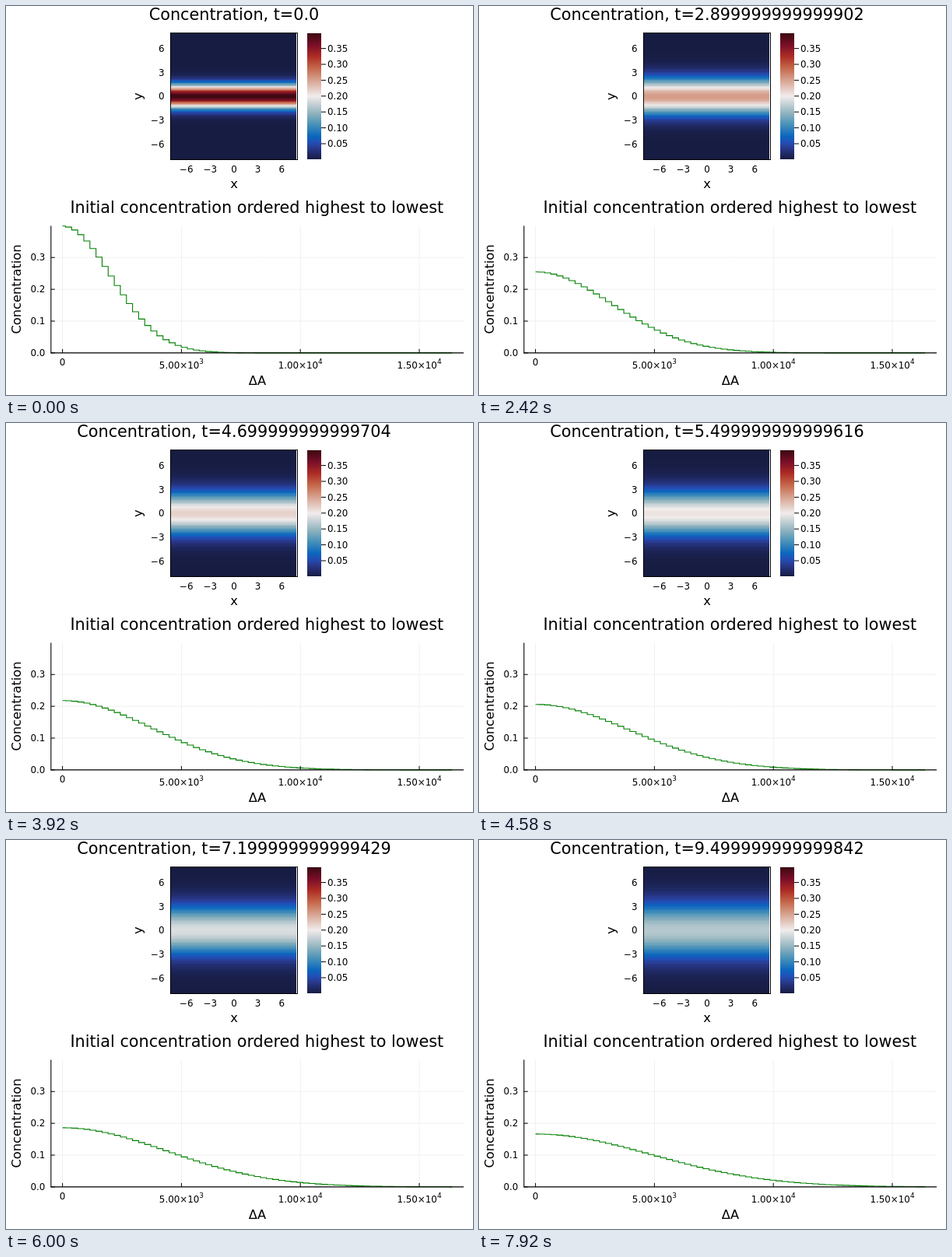
An HTML page with a canvas for the animation above (8 s loop, 600 by 500 pixels).

```html
<!DOCTYPE html>
<html lang="en">
<head>
<meta charset="utf-8">
<title>Diffusing concentration</title>
<style>
  html, body { margin: 0; width: 100%; height: 100%; overflow: hidden; background: #fff; }
  canvas { display: block; }
</style>
</head>
<body>
<canvas id="stage" width="600" height="500"></canvas>
<script>
const ctx = document.getElementById('stage').getContext('2d');
const LOOP = 8000, FRAMES_PER_CS = 0.12;
const PEAK = 1 / Math.sqrt(2 * Math.PI);
const TICK = 11.86, GUIDE = 16.3, TITLE = 20.75;

// Diverging colour scale: position, red, green, blue
const STOPS = [
  [0, 23, 28, 66], [1 / 11, 41, 58, 143], [1.5 / 11, 33, 79, 184], [2 / 11, 11, 102, 189],
  [3 / 11, 69, 144, 185], [4 / 11, 142, 178, 190], [5 / 11, 210, 216, 219], [0.5, 241, 236, 235],
  [6 / 11, 230, 210, 204], [7 / 11, 213, 157, 137], [8 / 11, 196, 101, 72],
  [9 / 11, 172, 43, 36], [10 / 11, 120, 14, 40], [1, 60, 9, 17]
];

function colour(value) {
  const v = Math.min(1, Math.max(0, value));
  const i = Math.max(1, STOPS.findIndex(s => s[0] >= v));
  const a = STOPS[i - 1], b = STOPS[i];
  const k = (v - a[0]) / (b[0] - a[0]);
  const [r, g, bl] = [1, 2, 3].map(c => Math.round(a[c] + (b[c] - a[c]) * k));
  return `rgb(${r},${g},${bl})`;
}

function text(str, x, y, size, align = 'center') {
  ctx.font = `${size}px "DejaVu Sans", sans-serif`;
  ctx.textAlign = align;
  ctx.fillStyle = '#000';
  ctx.fillText(str, x, y);
}

function verticalText(str, x, y, size) {
  ctx.save();
  ctx.translate(x, y);
  ctx.rotate(-Math.PI / 2);
  text(str, 0, 0, size);
  ctx.restore();
}

function line(x1, y1, x2, y2, style = '#000', width = 1) {
  ctx.strokeStyle = style;
  ctx.lineWidth = width;
  ctx.beginPath();
  ctx.moveTo(x1, y1);
  ctx.lineTo(x2, y2);
  ctx.stroke();
}

function powerLabel(base, exponent, x, y) {
  const supSize = TICK * 0.75;
  ctx.font = `${supSize}px "DejaVu Sans", sans-serif`;
  const supWidth = ctx.measureText(exponent).width;
  ctx.font = `${TICK}px "DejaVu Sans", sans-serif`;
  const baseWidth = ctx.measureText(base).width;
  const left = x - (baseWidth + supWidth) / 2;
  text(base, left, y, TICK, 'left');
  text(exponent, left + baseWidth, y - 6, supSize, 'left');
}

// The clock adds up many small time steps, so its rounding error shows in the title.
function clockLabel(frame) {
  let t = 0;
  for (let i = 0; i < frame * 50; i++) t += 0.002;
  return Number.isInteger(t) ? t.toFixed(1) : String(t);
}

function concentration(y, time) {
  const variance = 1 + time / 2;
  return PEAK / Math.sqrt(variance) * Math.exp(-y * y / (2 * variance));
}

function drawHeatmap(time) {
  const centreX = 293, centreY = 116.2, unit = 10.2;
  for (let py = 35; py < 198; py++) {
    const y = Math.round((centreY - py - 0.5) / unit * 8) / 8;
    ctx.fillStyle = colour(concentration(y, time) / PEAK);
    ctx.fillRect(211, py, 162, 1);
  }
  ctx.strokeStyle = '#000';
  ctx.lineWidth = 1;
  ctx.strokeRect(211.4, 34.7, 163.1, 162.8);
  for (const v of [-6, -3, 0, 3, 6]) {
    const label = String(v).replace('-', '\u2212');
    text(label, centreX + v * unit, 214, TICK);
    text(label, 203.5, centreY - v * unit + 4.2, TICK, 'right');
  }
  text('x', centreX, 234, GUIDE);
  verticalText('y', 174.5, centreY, GUIDE);
}

function drawColourBar() {
  for (let py = 35; py < 197; py++) {
    ctx.fillStyle = colour((197 - py - 0.5) / 162);
    ctx.fillRect(387, py, 18, 1);
  }
  for (let i = 1; i <= 7; i++) {
    const y = 197.4 - i * 20.4;
    line(405, y, 411, y);
    text((i * 0.05).toFixed(2), 413, y + 4.2, TICK, 'left');
  }
}

function drawProfile(time) {
  const left = 57.8, right = 588, top = 282.5, base = 445.9;
  const xOf = area => 72.6 + area * 0.03056;
  const yOf = value => base - value * 408.8;
  const areas = [0, 5000, 10000, 15000], levels = [0, 0.1, 0.2, 0.3];

  areas.forEach(a => line(xOf(a), top, xOf(a), base, '#f0f0f0'));
  levels.forEach(v => line(left, yOf(v), right, yOf(v), '#f0f0f0'));

  // One row at the centre, then symmetric pairs of rows.
  ctx.strokeStyle = '#008000';
  ctx.lineWidth = 1.1;
  ctx.beginPath();
  ctx.moveTo(xOf(0), yOf(concentration(0, time)));
  for (let k = 0; k <= 64; k++) {
    const y = yOf(concentration(k / 8, time));
    ctx.lineTo(xOf(Math.max(0, 256 * k - 128)), y);
    ctx.lineTo(xOf(Math.min(16384, 256 * k + 128)), y);
  }
  ctx.stroke();

  line(left, top, left, base + 0.5, '#000', 1.1);
  line(left, base, right, base, '#000', 1.1);
  areas.forEach(a => line(xOf(a), base, xOf(a), base - 5));
  levels.forEach(v => {
    line(left, yOf(v), left + 5, yOf(v));
    text(v.toFixed(1), 50.3, yOf(v) + 4.2, TICK, 'right');
  });

  text('0', xOf(0), 462, TICK);
  powerLabel('5.00×10', '3', xOf(5000), 465.5);
  powerLabel('1.00×10', '4', xOf(10000), 465.5);
  powerLabel('1.50×10', '4', xOf(15000), 465.5);
  text('ΔA', 323, 487, GUIDE);
  verticalText('Concentration', 19, 364, GUIDE);
  text('Initial concentration ordered highest to lowest', 322.3, 266.3, TITLE);
}

function draw(frame) {
  const time = frame / 10;
  ctx.fillStyle = '#fff';
  ctx.fillRect(0, 0, 600, 500);
  text('Concentration, t=' + clockLabel(frame), 293, 18.3, TITLE);
  drawHeatmap(time);
  drawColourBar();
  drawProfile(time);
}

const start = performance.now();
let shown = -1;

function tick() {
  const elapsed = (performance.now() - start) % LOOP;
  const frame = Math.floor((Math.floor(elapsed / 10) + 0.5) * FRAMES_PER_CS);
  if (frame !== shown) draw(shown = frame);
  requestAnimationFrame(tick);
}
tick();
</script>
</body>
</html>
```
